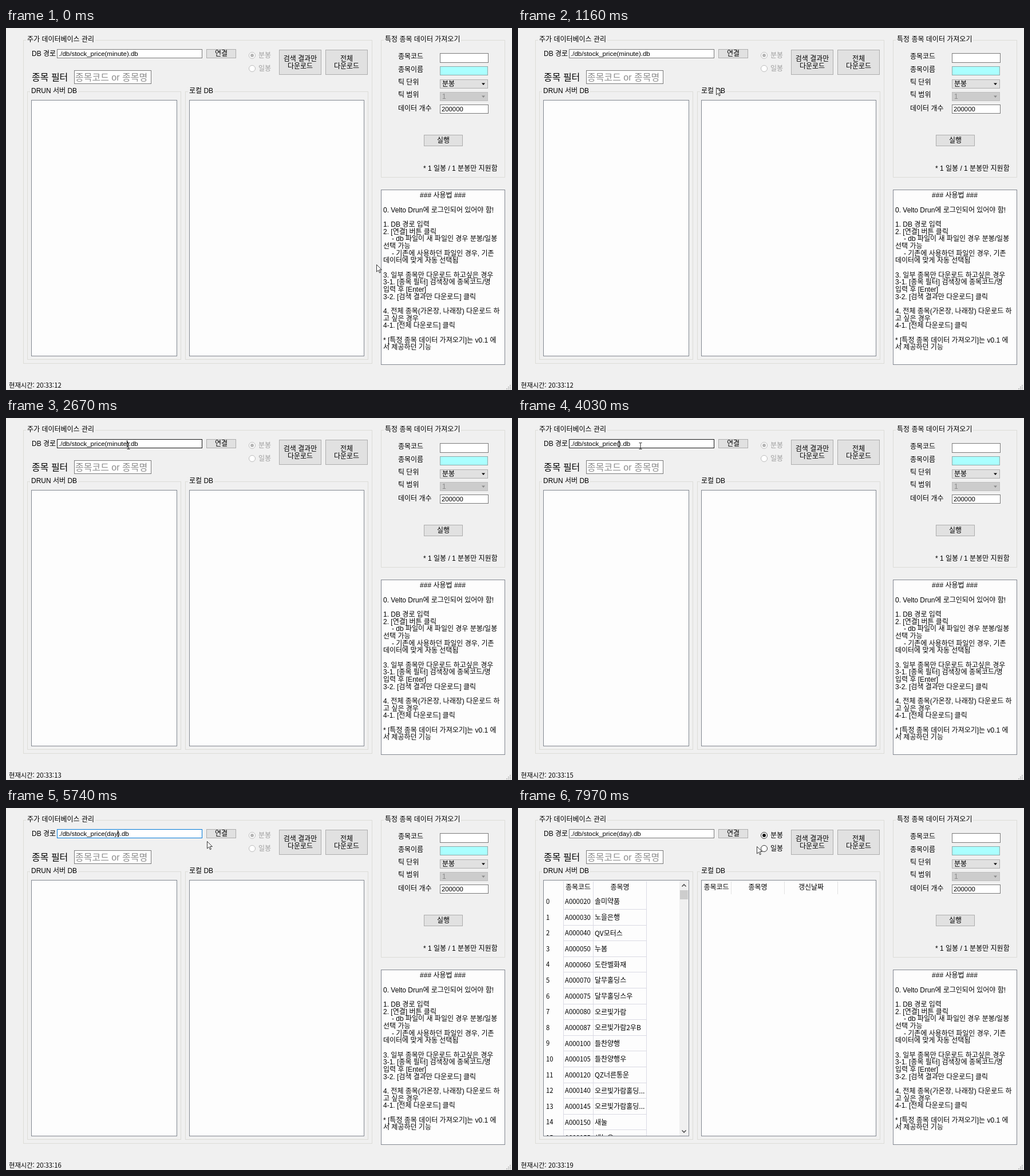
An HTML page that plays this animation: 884x634 px, repeating every 8 s.

```html
<!DOCTYPE html>
<html lang="ko">
<head>
<meta charset="utf-8">
<style>
  html, body { margin: 0; width: 100%; height: 100%; overflow: hidden; background: #f0f0f0; }
  svg { display: block; }
  rect, line { shape-rendering: crispEdges; }
  text { font-family: 'Liberation Sans', 'Noto Sans CJK KR', 'Noto Sans CJK', sans-serif; white-space: pre; }
  .table text { font-family: 'Noto Sans CJK KR', 'Noto Sans CJK', sans-serif; }
</style>
</head>
<body>
<svg id="stage" width="884" height="634" viewBox="0 0 884 634"></svg>
<script>
const LOOP = 8000;
const stage = document.getElementById('stage');
let layer = stage;

function add(tag, attrs, parent = layer) {
  const el = document.createElementNS('http://www.w3.org/2000/svg', tag);
  return parent.appendChild(set(el, attrs));
}
function set(el, attrs) {
  for (const key in attrs) el.setAttribute(key, attrs[key]);
  return el;
}
function show(el, on) { el.style.display = on ? '' : 'none'; }

// y is the visual middle of the line
function label(x, y, str, { size = 12, fill = '#000', anchor = 'start' } = {}) {
  const el = add('text', { x, y: y + size * 0.36, 'font-size': size, fill, 'text-anchor': anchor });
  el.textContent = str;
  return el;
}
const centered = (x, y, str) => label(x, y, str, { anchor: 'middle' });

// Edges are given as outermost pixels
function box(l, t, r, b, fill, stroke) {
  return add('rect', { x: l + .5, y: t + .5, width: r - l - 1, height: b - t - 1, fill, stroke });
}
const field = (l, t, r, b, fill = '#fff') => box(l, t, r, b, fill, '#7a7a7a');
const panel = (l, t, r, b) => box(l, t, r, b, '#fdfdfd', '#828790');
const rule = (x1, y1, x2, y2, stroke) => add('line', { x1, y1, x2, y2, stroke });

function group(l, t, r, b, x, title) {
  box(l, t, r, b, 'none', '#dcdcd8');
  const text = label(x, t - 1, title);
  const gap = add('rect', { x: x - 2, y: t - 6, width: text.getComputedTextLength() + 4, height: 12, fill: '#f0f0f0' });
  layer.insertBefore(gap, text);
}
function button(l, t, r, b, ...lines) {
  const face = box(l, t, r, b, '#e1e1e1', '#adadad');
  const mid = (t + b) / 2;
  lines.forEach((s, i) => centered((l + r) / 2, mid + (i - (lines.length - 1) / 2) * 13, s));
  return face;
}
function radio(y, str, checked) {
  const ring = add('circle', { cx: 430, cy: y, r: 5.5, fill: '#fff' });
  const dot = checked && add('circle', { cx: 430, cy: y, r: 3 });
  const text = label(441, y, str);
  return on => {
    ring.setAttribute('stroke', on ? '#333' : '#bcbcbc');
    if (dot) dot.setAttribute('fill', on ? '#111' : '#b4b4b4');
    text.setAttribute('fill', on ? '#000' : '#a0a0a0');
  };
}

// Database section
group(30, 21, 640, 588, 37, '주가 데이터베이스 관리');
label(45, 45, 'DB 경로');
const pathField = field(89, 37, 343, 53);
const pathText = label(92, 45, '', { size: 11.5 });
const caret = add('rect', { y: 39, width: 1, height: 12, fill: '#000' });
const connect = button(350, 37, 402, 53, '연결');
const radios = [radio(48, '분봉', true), radio(71, '일봉', false)];
button(477, 38, 551, 82, '검색 결과만', '다운로드');
button(558, 38, 632, 82, '전체', '다운로드');
label(45, 86, '종목 필터', { size: 16 });
field(119, 74, 254, 98);
label(121, 86, '종목코드 or 종목명', { size: 16, fill: '#8c8c8c' });
group(37, 111, 306, 581, 44, 'DRUN 서버 DB');
group(313, 111, 633, 581, 320, '로컬 DB');
panel(44, 126, 299, 575);
panel(320, 126, 626, 575);

// Single item section
group(655, 21, 872, 262, 662, '특정 종목 데이터 가져오기');
['종목코드', '종목이름', '틱 단위', '틱 범위', '데이터 개수']
  .forEach((s, i) => label(685, [50, 73, 95, 117, 141][i], s));
field(758, 44, 843, 61);
box(758, 67, 842, 83, '#aaffff', '#8fa8a8');
function combo(t, str, fill, stroke, ink) {
  box(758, t, 842, t + 16, fill, stroke);
  label(762, t + 8, str, { fill: ink });
  add('path', { d: `M831 ${t + 6.5}h6l-3 3.5z`, fill: ink });
}
combo(90, '분봉', '#e1e1e1', '#adadad', '#000');
combo(112, '1', '#cccccc', '#bfbfbf', '#8a8a8a');
field(758, 134, 843, 150);
label(761, 142, '200000', { size: 11.3 });
button(730, 187, 798, 207, '실행');
label(729, 246, '* 1 일봉 / 1 분봉만 지원함');

// Help text
panel(655, 283, 872, 590);
centered(763, 293, '### 사용법 ###');
`

0. Velto Drun에 로그인되어 있어야 함!

1. DB 경로 입력
2. [연결] 버튼 클릭
>- db 파일이 새 파일인 경우 분봉/일봉
선택 가능
>- 기존에 사용하던 파일인 경우, 기존
데이터에 맞게 자동 선택됨

3. 일부 종목만 다운로드 하고싶은 경우
3-1. [종목 필터] 검색창에 종목코드/명
입력 후 [Enter]
3-2. [검색 결과만 다운로드] 클릭

4. 전체 종목(가온장, 나래장) 다운로드 하
고 싶은 경우
4-1. [전체 다운로드] 클릭

* [특정 종목 데이터 가져오기]는 v0.1 에
서 제공하던 기능`.split('\n').forEach((s, i) => {
  const indent = s.startsWith('>');
  label(indent ? 674 : 659, 293 + i * 12.67, indent ? s.slice(1) : s);
});

// Status bar
const status = add('g', { class: 'table' });
layer = status;
const clock = label(5, 626, '', { size: 11.3 });
layer = stage;
for (let i = 0; i < 3; i++)
  for (let j = 0; j <= i; j++)
    add('rect', { x: 880 - j * 3, y: 625 + i * 3, width: 2, height: 2, fill: '#bfbfbf' });

// Loaded tables
const ITEMS = [
  ['020', '솔미약품'], ['030', '노을은행'], ['040', 'QV모터스'], ['050', '누봄'],
  ['060', '도란벨화재'], ['070', '달무홀딩스'], ['075', '달무홀딩스우'], ['080', '오르빛가람'],
  ['087', '오르빛가람2우B'], ['100', '들찬양행'], ['105', '들찬양행우'], ['120', 'QZ너른통운'],
  ['140', '오르빛가람홀딩...'], ['145', '오르빛가람홀딩...'], ['150', '새눌'], ['155', '새눌우']
];
const GRID = '#dadae4';
add('rect', { x: 45, y: 127, width: 253, height: 447 },
  add('clipPath', { id: 'view' }));
const tables = add('g', { class: 'table', 'clip-path': 'url(#view)' });
const headers = add('g', { class: 'table' });
layer = tables;
centered(105, 139, '종목코드');
centered(178, 139, '종목명');
[79, 131, 224].forEach(x => rule(x + .5, 128, x + .5, x === 224 ? 574 : 574, GRID));
ITEMS.forEach(([code, name], i) => {
  const y = 164 + i * 27.6;
  label(49, y, i, { size: 11.3 });
  label(82, y, 'A000' + code, { size: 11.4 });
  label(134, y, name);
  const edge = Math.round(y + 13) + .5;
  rule(79, edge, 225, edge, GRID);
});
add('rect', { x: 282, y: 127, width: 16, height: 447, fill: '#f0f0f0' });
add('rect', { x: 283, y: 144, width: 14, height: 16, fill: '#cdcdcd' });
['M286.500 137.500l3.500-3.500 3.500 3.500', 'M286.500 564.500l3.500 3.500 3.500-3.500']
  .forEach(d => add('path', { d, fill: 'none', stroke: '#505050', 'stroke-width': 1.6 }));
layer = headers;
centered(346.5, 139, '종목코드');
centered(419, 139, '종목명');
centered(512, 139, '갱신날짜');
[372, 465, 558].forEach(x => rule(x + .5, 128, x + .5, 151, '#e2e2e2'));
layer = stage;

// Pointers
const arrow = add('path', {
  d: 'M.5 .5v12.500l3-2.800 2 4.600 1.900-.8-2-4.500h4z',
  fill: '#fff', stroke: '#222', 'stroke-width': .9
});
const beam = add('path', {
  d: 'M-2.500 -5.500h2l.5 .5 .5-.5h2M0 -5v10M-2.500 5.500h2l.5-.5 .5 .5h2',
  fill: 'none', stroke: '#222'
});

const ROUTE = [
  [0, 647, 414], [250, 647, 414], [1160, 346, 104], [1800, 214, 49], [4850, 214, 49],
  [5600, 351, 58], [5850, 351, 58], [6300, 363, 47], [7350, 363, 47], [7900, 417, 67], [LOOP, 417, 67]
];
const DELETES = [3000, 3170, 3340, 3510, 3680, 3850];
const TYPES = [4250, 4450, 4650];
const CLICK = 2150, PRESS = 6600, LOADED = 7100, BLINK = 530;

function pointerAt(t) {
  const i = ROUTE.findIndex(p => p[0] > t);
  const [t0, x0, y0] = ROUTE[i - 1], [t1, x1, y1] = ROUTE[i];
  const u = (t - t0) / (t1 - t0), e = u * u * (3 - 2 * u);
  return [x0 + (x1 - x0) * e, y0 + (y1 - y0) * e];
}
const within = ([x, y], l, t, r, b) => x >= l && x < r && y >= t && y < b;
const count = (times, t) => times.filter(k => k <= t).length;

function draw(t) {
  const at = pointerAt(t);
  const overField = within(at, 89, 37, 343, 53);
  const overButton = within(at, 350, 37, 402, 53);
  const focused = t >= CLICK && t < PRESS;
  const pressed = t >= PRESS && t < LOADED;
  const loaded = t >= LOADED;

  const place = `translate(${Math.round(at[0])} ${Math.round(at[1])})`;
  arrow.setAttribute('transform', place);
  beam.setAttribute('transform', place);
  show(arrow, !overField);
  show(beam, overField);

  const word = 'minute'.slice(0, 6 - count(DELETES, t)) + 'day'.slice(0, count(TYPES, t));
  const before = './db/stock_price(' + word;
  pathText.textContent = before + ').db';
  pathField.setAttribute('stroke', overField ? '#171717' : focused ? '#0078d7' : '#7a7a7a');

  const lastKey = Math.max(...[CLICK, ...DELETES, ...TYPES].filter(k => k <= t));
  show(caret, focused && Math.floor((t - lastKey) / BLINK) % 2 === 0);
  caret.setAttribute('x', Math.round(92 + pathText.getSubStringLength(0, before.length)));

  set(connect, pressed ? { fill: '#cce4f7', stroke: '#005499' }
    : overButton ? { fill: '#e5f1fb', stroke: '#0078d7' }
    : { fill: '#e1e1e1', stroke: '#adadad' });

  radios.forEach(update => update(loaded));
  show(tables, loaded);
  show(headers, loaded);
  clock.textContent = '현재시간: 20:33:' + (12 + Math.max(0, Math.floor((t - 880) / 1000)));
}

let start;
function tick(now) {
  start ??= now;
  draw((now - start) % LOOP);
  requestAnimationFrame(tick);
}
draw(0);
requestAnimationFrame(tick);
</script>
</body>
</html>
```
